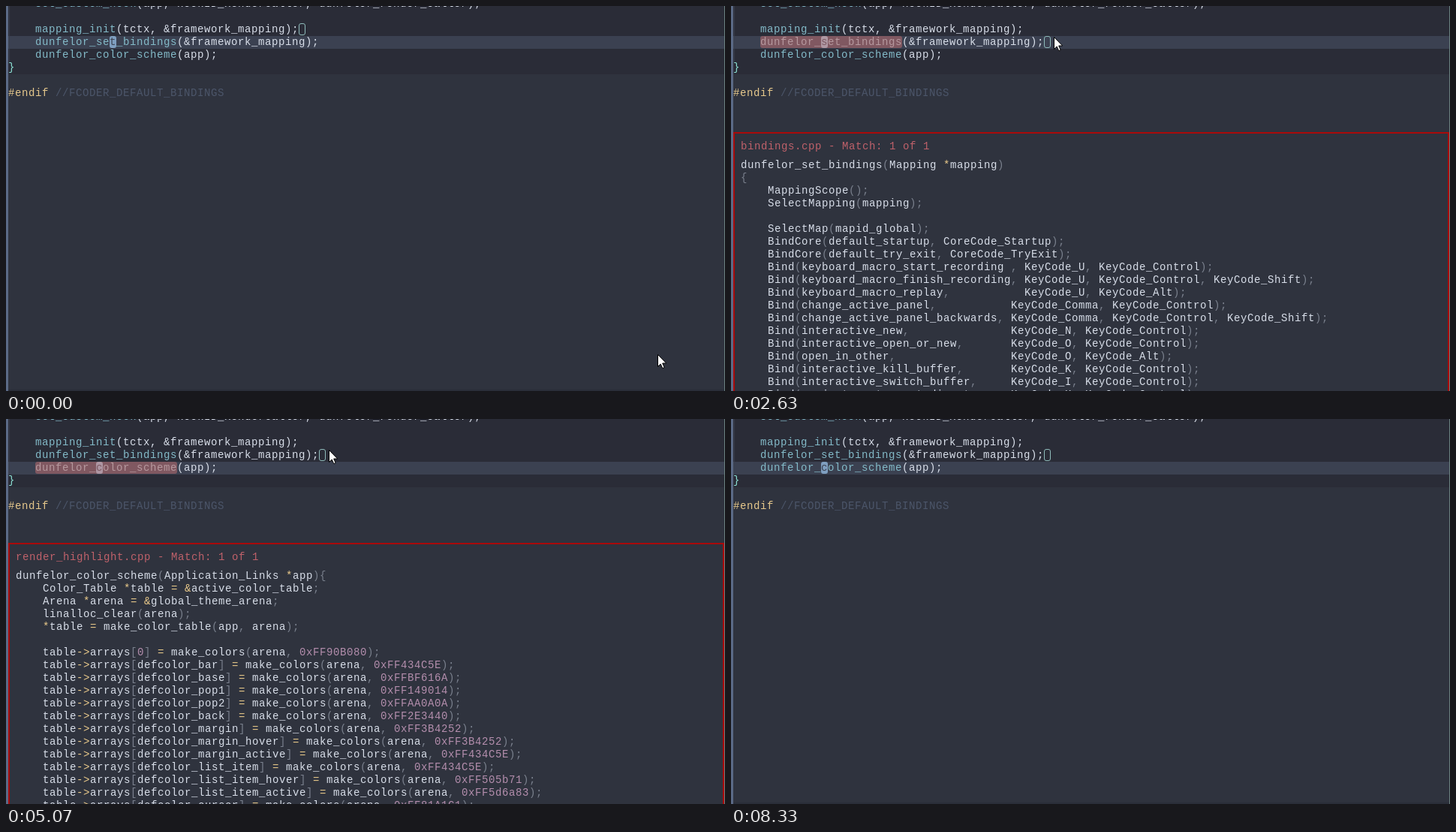
An HTML page that plays this animation: 958x513 px, repeating every 8360 ms.

```html
<!DOCTYPE html>
<html lang="en">
<head>
<meta charset="utf-8">
<title>Code peek</title>
<style>
  html, body { margin: 0; width: 100%; height: 100%; overflow: hidden; background: #2f333e; }
  svg { display: block; width: 958px; height: 513px; }
  text { font: 14px "Liberation Mono", monospace; white-space: pre; fill: #d8dee9; }
  .fn { fill: #83bac8; }
  .brace { fill: #8ce0d4; }
  .pre { fill: #e6c88c; }
  .note { fill: #4c566a; }
  .title { fill: #bf616a; }
  .dim { fill: #7a808d; }
  .op { fill: #ebcb8b; }
  .num { fill: #b48ead; }
</style>
</head>
<body>
<svg id="stage" viewBox="0 0 958 513">
  <rect width="958" height="513" fill="#2f333e"/>
  <rect width="958" height="91" fill="#2a2c37"/>
  <rect x="4" width="1" height="74" fill="#373c4a"/>
  <rect y="511" width="958" height="2" fill="#2a2e39"/>
  <rect id="row" x="3" width="954" height="17" fill="#3b4151"/>
  <rect id="name" x="39" width="189" height="16" rx="3" fill="#805861"/>
  <rect id="cursor" width="9" height="16" rx="3"/>
  <g id="code"></g>
  <rect id="mark" x=".5" y=".5" width="8" height="15" rx="2.5" fill="none" stroke="#8fbcbb"/>
  <g id="panel">
    <rect x="4" y="1" width="952" height="600" fill="#2f333e" stroke="#aa0a0a" stroke-width="2"/>
    <g class="page"></g>
    <g class="page"></g>
  </g>
  <rect width="3" height="513" fill="#5b6a86"/>
  <rect x="957" width="1" height="513" fill="#6a807f"/>
  <path id="mouse" d="M.5.5V16.5L4.2 13L6.8 18.7L9.2 17.6L6.7 12H11.7Z" fill="#fff" stroke="#000" stroke-width="1"/>
</svg>
<script>
const LOOP = 8360, CHAR = 9, ROW = 17, BASE = 12, LEFT = 39, TOP = 23, RATE = 10.4;
const SHUT = 513, OPEN = 156;
const $ = id => document.getElementById(id);

function add(parent, tag, attrs, text = '') {
  const el = document.createElementNS('http://www.w3.org/2000/svg', tag);
  for (const key in attrs) el.setAttribute(key, attrs[key]);
  el.textContent = text;
  return parent.appendChild(el);
}

// Track the monospace text out to whole-pixel cells.
const probe = add($('stage'), 'text', {}, '0'.repeat(20));
$('stage').style.letterSpacing = CHAR - probe.getComputedTextLength() / 20 + 'px';
probe.remove();

// The editor buffer: one tspan per character so that single cells can be tinted.
function codeLine(row, x, ...parts) {
  const line = add($('code'), 'text', { x, y: TOP + row * ROW + BASE });
  for (const [text, cls] of parts)
    for (const ch of text) add(line, 'tspan', { class: cls || '' }, ch);
  return [...line.children];
}

codeLine(-2, LEFT, ['set_custom_hook', 'fn'], ['(app, HookID_RenderCaller, dunfelor_render_caller);']);
const cells = [
  codeLine(0, LEFT, ['mapping_init', 'fn'], ['(tctx, &framework_mapping);']),
  codeLine(1, LEFT, ['dunfelor_set_bindings', 'fn'], ['(&framework_mapping);']),
  codeLine(2, LEFT, ['dunfelor_color_scheme', 'fn'], ['(app);'])
];
codeLine(3, 3, ['}', 'brace']);
codeLine(5, 3, ['#endif', 'pre'], [' //FCODER_DEFAULT_BINDINGS', 'note']);

// The two pages of the peek panel.
const bind = (name, keys, col = 36) => '    ' + `Bind(${name},`.padEnd(col) +
  keys.split(' ').map(k => 'KeyCode_' + k).join(', ') + ');';
const color = (name, value) => `    table->arrays[${name}] = make_colors(arena, 0xFF${value});`;
const def = (name, value) => color('defcolor_' + name, value);

const pages = [
  ['bindings.cpp',
    'dunfelor_set_bindings(Mapping *mapping)',
    '{',
    '    MappingScope();',
    '    SelectMapping(mapping);',
    '',
    '    SelectMap(mapid_global);',
    '    BindCore(default_startup, CoreCode_Startup);',
    '    BindCore(default_try_exit, CoreCode_TryExit);',
    bind('keyboard_macro_start_recording ', 'U Control', 38),
    bind('keyboard_macro_finish_recording', 'U Control Shift', 38),
    bind('keyboard_macro_replay', 'U Alt', 38),
    bind('change_active_panel', 'Comma Control'),
    bind('change_active_panel_backwards', 'Comma Control Shift'),
    bind('interactive_new', 'N Control'),
    bind('interactive_open_or_new', 'O Control'),
    bind('open_in_other', 'O Alt'),
    bind('interactive_kill_buffer', 'K Control'),
    bind('interactive_switch_buffer', 'I Control'),
    bind('project_go_to_root_directory', 'H Control')],
  ['render_highlight.cpp',
    'dunfelor_color_scheme(Application_Links *app){',
    '    Color_Table *table = &active_color_table;',
    '    Arena *arena = &global_theme_arena;',
    '    linalloc_clear(arena);',
    '    *table = make_color_table(app, arena);',
    '',
    color('0', '90B080'),
    def('bar', '434C5E'),
    def('base', 'BF616A'),
    def('pop1', '149014'),
    def('pop2', 'AA0A0A'),
    def('back', '2E3440'),
    def('margin', '3B4252'),
    def('margin_hover', '3B4252'),
    def('margin_active', '434C5E'),
    def('list_item', '434C5E'),
    def('list_item_hover', '505b71'),
    def('list_item_active', '5d6a83'),
    def('cursor', '81A1C1')]
];

const tokens = /(\b0x\w+|\b\d+\b)|(->|[*=&])|([()[\]{},;]+)|[\w ]+?(?=\b0x|\b\d+\b|->|[*=&()[\]{},;]|$)/g;
const pageEls = document.querySelectorAll('.page');
pages.forEach(([file, ...lines], p) => {
  add(pageEls[p], 'text', { x: 13, y: 11 + BASE, class: 'title' }, file + ' - Match: 1 of 1');
  lines.forEach((src, i) => {
    const line = add(pageEls[p], 'text', { x: 13, y: 36 + BASE + i * ROW });
    for (const [text, num, op, dim] of src.matchAll(tokens))
      add(line, 'tspan', { class: num ? 'num' : op ? 'op' : dim ? 'dim' : '' }, text);
  });
});

// Keys are [time, value]; the value chases the newest key exponentially.
function chase(keys, t) {
  let v = keys[0][1];
  keys.forEach(([start, goal], i) => {
    if (t < start) return;
    const end = Math.min(t, i + 1 < keys.length ? keys[i + 1][0] : t);
    v = goal + (v - goal) * Math.exp(-RATE * (end - start) / 1000);
  });
  return v;
}
const latest = (keys, t) => keys.filter(k => k[0] <= t).pop()[1];

const colKeys = [[0, 11], [700, 42], [1560, 23], [1900, 9]];
const rowKeys = [[0, 1], [4450, 2]];
const panelKeys = [[0, SHUT], [2304, OPEN], [3700, SHUT], [4721, OPEN], [7670, SHUT]];

function glide(t, start, end, from, to) {
  const u = Math.max(0, Math.min(1, (t - start) / (end - start)));
  const s = u * u * (3 - 2 * u);
  return from.map((a, i) => a + (to[i] - a) * s);
}

function place(el, x, y) {
  el.setAttribute('transform', `translate(${Math.round(x)} ${Math.round(y)})`);
}

function tint(row, col, fill) {
  if (cells[row][col]) cells[row][col].style.fill = fill;
}

function draw(t) {
  const col = latest(colKeys, t), row = latest(rowKeys, t);
  const peek = latest(panelKeys, t) === OPEN;
  const rowY = TOP + row * ROW;

  $('row').setAttribute('y', rowY);
  $('name').setAttribute('y', rowY);
  $('name').style.display = peek ? '' : 'none';

  const cursor = $('cursor');
  place(cursor, LEFT + chase(colKeys, t) * CHAR, TOP + chase(rowKeys, t) * ROW);
  cursor.style.fill = peek ? '#b09aa6' : '#7f9fc0';
  cursor.style.opacity = 0.95 + 0.05 * Math.cos(t / 190);

  const clicked = t >= 700;
  place($('mark'), LEFT + (clicked ? 42 : 39) * CHAR, TOP + (clicked ? ROW : 0));

  cells.flat().forEach(c => c.style.fill = '');
  if (peek) for (let i = 0; i < 21; i++) tint(row, i, '#b5989e');
  if (row === 1 && col > 21 && col < 41) [21, 40].forEach(i => tint(1, i, '#8c1c22'));
  tint(row, col, peek ? '#7d5a64' : '#3b4252');

  const top = Math.round(chase(panelKeys, t));
  place($('panel'), 0, top);
  $('panel').style.display = top < SHUT ? '' : 'none';
  pageEls.forEach((el, i) => el.style.display = i === row - 1 ? '' : 'none');

  const rest = [430, 41];
  const spot = t < 3000 ? glide(t, 0, 700, [868, 464], rest) : glide(t, 6830, 7630, rest, [85, 492]);
  place($('mouse'), ...spot);
  $('mouse').style.display = t < 7650 ? '' : 'none';
}

const begin = performance.now();
function tick() {
  draw((performance.now() - begin) % LOOP);
  requestAnimationFrame(tick);
}
draw(0);
requestAnimationFrame(tick);
</script>
</body>
</html>
```
